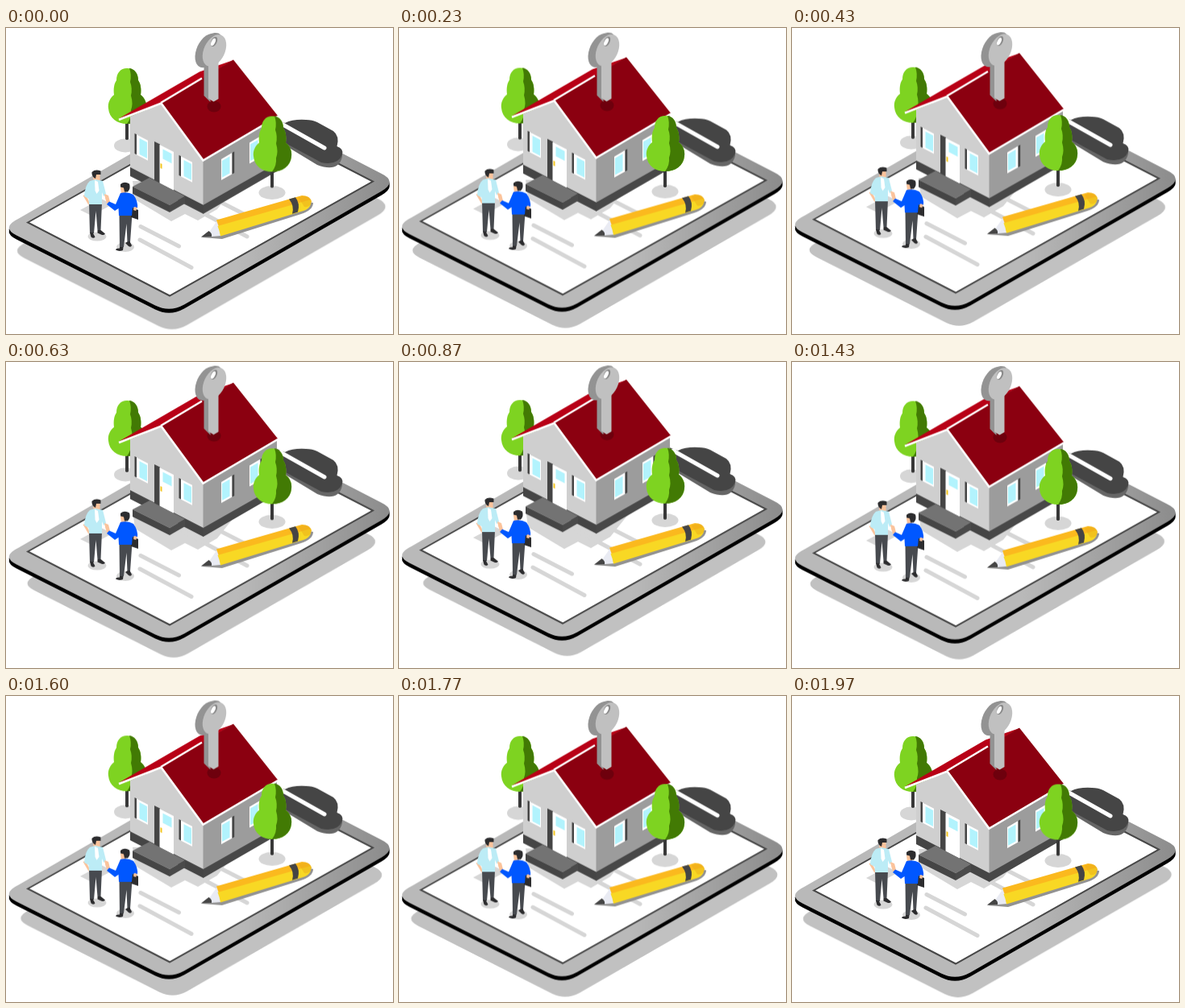
Recreate the animation shown at these times as an HTML page. Size 480 by 380 pixels, loop 2.01 s.

```html
<!DOCTYPE html>
<html lang="en">
<head>
<meta charset="utf-8">
<title>House agreement</title>
<style>
  html, body { margin: 0; width: 100%; height: 100%; overflow: hidden; background: #fff; }
  svg { display: block; width: 480px; height: 380px; }
  .float { animation: float 1005ms cubic-bezier(.37, 0, .63, 1) -55ms infinite alternate; }
  .shrink { transform-origin: 242.5px 245px; animation: shrink 1005ms cubic-bezier(.37, 0, .63, 1) -55ms infinite alternate; }
  .board { --rise: -8px; }
  .house { --rise: -18px; }
  .tree { --rise: -2.8px; }
  .key { --rise: -1.7px; }
  .dent { --rise: -7.5px; }
  @keyframes float { from { transform: translateY(0); } to { transform: translateY(var(--rise)); } }
  @keyframes shrink { from { transform: scale(1); } to { transform: scale(.928); } }
  .shade { fill: #d6d6d6; }
  .dark { fill: #454545; }
  .white { fill: #fff; }
  .glass { fill: #b2f3fd; }
  .skin { fill: #fbc39b; }
  .cloth { fill: #474a4f; }
  .ink { fill: #2c2c2e; }
</style>
</head>
<body>
<svg viewBox="0 0 480 380" xmlns="http://www.w3.org/2000/svg">
  <defs>
    <linearGradient id="metal">
      <stop offset="0" stop-color="#b9b9b9"/>
      <stop offset=".6" stop-color="#b9b9b9"/>
      <stop offset="1" stop-color="#8c8c8c"/>
    </linearGradient>
    <path id="slab" d="M16 236L263 93Q279 84 295 92L465 180Q486 190 466 202L221 343Q203 353 185 344L13 257Q-7 247 16 236Z"/>
    <g id="tree">
      <path d="M148 112h4v26q-2 2-4 0z" fill="#383838"/>
      <path fill="#7ed321" d="M150 50C142 50 137 56 137 65C134 69 133 76 134 83C129 87 126 93 127 100C128 112 138 119 150 119C163 119 173 112 174 100C175 93 172 87 167 83C168 76 167 69 164 65C164 56 159 50 150 50Z"/>
      <path fill="#427a04" d="M153 50C160 51 164 57 164 65C167 69 168 76 167 83C172 87 175 93 174 100C173 112 163 119 150 119Q156 111 155 102Q158 94 155 84Q157 75 154 67Q156 58 153 50Z"/>
    </g>
    <g id="frontWindow">
      <path class="dark" d="M159.500 131l2.500 1.300v25l-2.500-1.300z"/>
      <path class="white" d="M162 132.500l14 7.200v25l-14-7.200z"/>
      <path class="glass" d="M165.500 137l9.500 4.900v20l-9.500-4.900z"/>
    </g>
    <g id="sideWindow">
      <path class="white" d="M267 163l13.500-8v26.500l-13.500 7.500z"/>
      <path class="glass" d="M268 165l9.500-5.600v21l-9.500 5.400z"/>
      <path class="dark" d="M280.500 155l2.700-1.600v26.500l-2.700 1.600z"/>
    </g>
  </defs>

  <g class="shrink">
    <use href="#slab" fill="#c1c1c1" transform="matrix(.968 0 0 .968 10.200 37.100)"/>
  </g>

  <g class="float board">
    <use href="#slab" y="5.500"/>
    <use href="#slab" y="3"/>
    <use href="#slab" y=".5" fill="url(#metal)"/>
    <path d="M27 241.500L279 99.500L455 190.500L203 332.500Z" fill="#fff" stroke="#464646" stroke-width="2"/>

    <!-- clip -->
    <path fill="#666" d="M330 136L386 170Q412 180 417 160V154L400 145Z"/>
    <path class="dark" d="M334 114L346 118Q356 113 372 114Q380 114 386 117L406 128Q414 134 410.500 147Q419 150 417 157Q412 171 391 167L330 134Z"/>
    <path d="M340 118L395 149" stroke="#fff" stroke-width="5" stroke-linecap="round"/>

    <!-- ground shadows and written lines -->
    <path class="shade" d="M92 226L118 212L132 219L106 233ZM157 190L290 190L262 225L238 239L222 231L205 240L160 213Z"/>
    <g stroke="#d6d6d6" stroke-width="5" stroke-linecap="round">
      <path d="M167 246.500l47.500 24.500M166 263l64 34.500M220 217l79 42M256 211l43 22"/>
    </g>
    <g class="shade">
      <ellipse cx="148" cy="146" rx="14" ry="8.500"/>
      <ellipse cx="330" cy="204.500" rx="16.500" ry="8.500"/>
      <ellipse cx="113" cy="259" rx="11.500" ry="5.500"/>
      <ellipse cx="148" cy="272" rx="11" ry="6"/>
    </g>
  </g>

  <use class="float tree" href="#tree"/>

  <g class="float house">
    <path fill="#cfcfcf" d="M154 110L193 94L245 165V222L154 175Z"/>
    <path fill="#9c9c9c" d="M244.500 164L336 111V170L244.500 222Z"/>
    <path class="dark" d="M154 173L245 220V231L154 184Z"/>
    <path fill="#484848" d="M244.500 220L336 168V178L244.500 231Z"/>

    <use href="#frontWindow"/>
    <use href="#frontWindow" x="55" y="27"/>
    <use href="#sideWindow"/>
    <use href="#sideWindow" x="35" y="-20.500"/>

    <path class="dark" d="M184 141l7 3.600v49l-7-3.600z"/>
    <path class="white" d="M190.500 145l17.500 9v48l-17.500-9z"/>
    <path class="glass" d="M194.500 150.500l11 5.700v12l-11-5.700z"/>
    <path fill="#f4c51d" d="M191.500 168l2 1v6l-2-1z"/>

    <path fill="#737373" d="M157 197L178 186L222 209L203 220Z"/>
    <path class="dark" d="M157 197L203 220V229L157 206Z"/>
    <path fill="#4a4a4a" d="M203 220L222 209V218L203 229Z"/>

    <path fill="#b80016" d="M140 112.500L240 54.500L282 40L193 94Z"/>
    <path fill="#8b0010" d="M193 93L282 39.500L337 109L244.500 164Z"/>
    <path fill="none" stroke="#fff" stroke-width="2.600" d="M140 114L192.500 93.500L244.500 164.500L337 110M192 93L243 62.500"/>
  </g>

  <ellipse class="float dent" cx="258" cy="97.500" rx="8.500" ry="7" fill="#6e000d"/>

  <g class="float key">
    <g fill="#939393">
      <ellipse cx="250" cy="28" rx="13.500" ry="22.500" transform="rotate(25 250 28)"/>
      <ellipse cx="254" cy="27" rx="13" ry="22.500" transform="rotate(25 254 27)"/>
      <path d="M245.500 44h8v48l-8-8z"/>
    </g>
    <g fill="#c0c0c0">
      <ellipse cx="258.500" cy="28" rx="13" ry="21" transform="rotate(25 258.500 28)"/>
      <path d="M251 42h12.500v46l-6 3.500-6.500-4z"/>
    </g>
    <ellipse cx="258" cy="17" rx="3.600" ry="6.500" fill="#8a8a8a" transform="rotate(25 258 17)"/>
    <ellipse cx="257" cy="17.500" rx="2.300" ry="5" fill="#fff" transform="rotate(25 257 17.500)"/>
  </g>

  <use class="float tree" href="#tree" x="180" y="59.500"/>

  <g class="float board">
    <!-- pencil -->
    <path fill="#929292" d="M242 260L268 262L366 231Q381 226 381 217L362 214Z"/>
    <path fill="#e9ebf3" d="M253 252L262 239L267 258L255 259Z"/>
    <path class="dark" d="M242 259.500L251.500 252Q256 255 255 259Z"/>
    <path fill="#fbb91e" d="M261 238.500L367 208Q377 208 379 216L264 247Z"/>
    <path fill="#f8d824" d="M262.500 246L378 213Q380 223 369 227L266 258.500Q265 252 262.500 246Z"/>
    <path fill="#e9ac18" d="M363 211Q377 205 379 216Q377 223 370 222Z" opacity=".5"/>
    <path class="dark" d="M351 212.500L359 210.300Q365 218 362 228.500L355 230.700Q358 221 351 212.500Z"/>

    <!-- client -->
    <path class="cloth" d="M103 217H119L117.500 251H113.500L111.500 227L109 255H104Z"/>
    <path class="ink" d="M104 254l3.500 0 3 5.500q-2 2.500-5 0zM113.500 251h4l5.500 4.500q-2 2.500-5 1l-4.500-2z"/>
    <path class="skin" d="M95.500 208l3-1 5 9-1 4zM122 206l5 4 1 5-4-1zM108 182h8.500v7l-4 4-4-3z"/>
    <path fill="#bcecf6" d="M104 190L111 188L120 190L124 206L121 209L119 204V219L103 219L102.500 212L97 209Q98 195 104 190Z"/>
    <path class="white" d="M110 189l4 2 1.500 11-3 4-2-4z"/>
    <path class="ink" d="M106.500 179q4-4 11-1.500v4.500h-5.500l-1 5q-5-2-4.500-8z"/>

    <!-- agent -->
    <path class="skin" d="M122 206l5 2 2 8-4 2zM142 198h7v8h-6z"/>
    <path class="cloth" d="M140.500 231H156.500L154 266H150.500L149.500 243L146 272H141Z"/>
    <path class="ink" d="M141 272h4.500l-.5 4q-5 2-9-.5 0-2 5-2zM150.500 265.500l3-.5 2.500 5q-1 3-4 1l-4-4z"/>
    <path class="ink" d="M155 222l9 4v12l-9-3z"/>
    <path fill="#0057ff" d="M142 205Q151 203 158 207Q164 215 163 224L157 223L156 233H140L139.500 224L135 227L125 219L128 215.500L136 219Z"/>
    <path class="skin" d="M159 222l4 1-2 4-3-1z"/>
    <path class="ink" d="M142 194q5-4 11-.5 2 6-2 10h-4l-1-5-4-1z"/>
  </g>
</svg>
</body>
</html>
```
